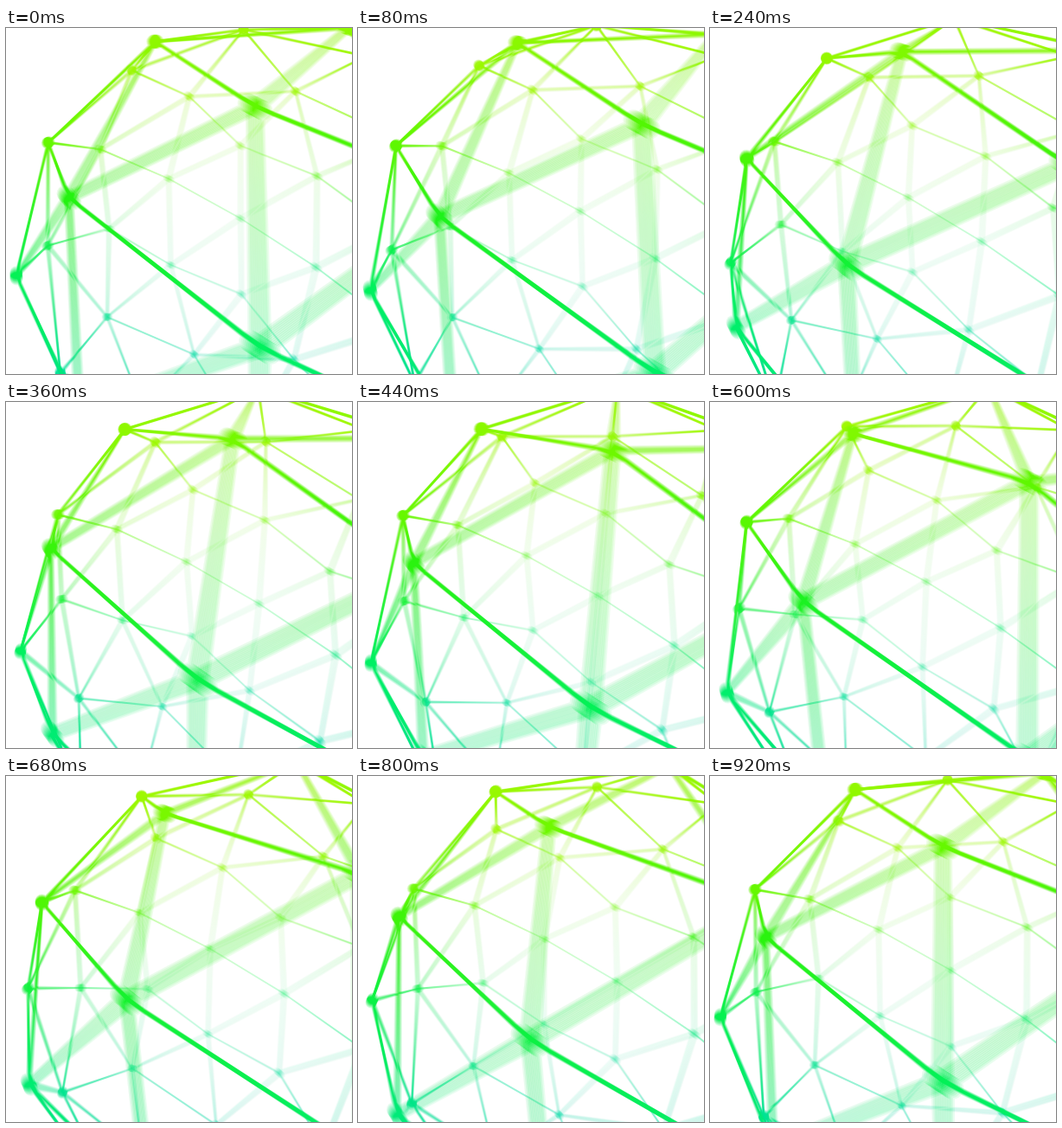
Animation, 400 px wide and 400 px high, one loop 960 ms. Source, as an HTML page with a canvas:

```html
<!DOCTYPE html>
<html>
<head>
<meta charset="utf-8">
<style>
  html, body { margin: 0; width: 100%; height: 100%; overflow: hidden; background: #fff; }
  canvas { display: block; width: 400px; height: 400px; }
</style>
</head>
<body>
<canvas id="stage" width="400" height="400"></canvas>
<script>
const SIZE = 400, STEP_MS = 40, STEPS = 24, TURN = 72, SHUTTER = 12;
const out = document.getElementById('stage').getContext('2d');
const layer = document.createElement('canvas');
layer.width = layer.height = SIZE;
const g = layer.getContext('2d');

// Spin axis and equator basis in view space: x right, y down, z to the viewer
const U = [-.8542, -.4603, .2417], V = [.1345, .249, .9592], N = [.5017, -.8518, .1508];
const DISTANCE = 1.779, SCALE = 242.5, CENTER = [.314, .22];

const rad = deg => deg * Math.PI / 180;
const dist = (a, b) => Math.hypot(a[0] - b[0], a[1] - b[1], a[2] - b[2]);
const mix = (a, b, t) => a + (b - a) * t;

// Icosahedron, each edge split once and pushed out to the sphere
function buildSphere() {
  const corners = [[0, 0, 1], [0, 0, -1]];
  const ring = (start, z) => {
    for (let k = 0; k < 5; k++) {
      const a = rad(start + 72 * k);
      corners.push([Math.cos(a) * 2 / Math.sqrt(5), Math.sin(a) * 2 / Math.sqrt(5), z]);
    }
  };
  ring(54, 1 / Math.sqrt(5));
  ring(18, -1 / Math.sqrt(5));
  const pairs = (points, reach) => points.flatMap((p, i) =>
    points.slice(i + 1).map((q, j) => [i, i + 1 + j]).filter(e => dist(p, points[e[1]]) < reach));
  const middles = pairs(corners, 1.1).map(([i, j]) => {
    const m = corners[i].map((c, k) => c + corners[j][k]);
    const length = Math.hypot(...m);
    return m.map(c => c / length);
  });
  const points = corners.concat(middles);
  return { points, edges: pairs(points, .7) };
}
const sphere = buildSphere();

// Height on the sphere -> red, green, blue
const RAMP = [
  [-.85, 158, 248, 0], [-.45, 100, 248, 0], [-.22, 36, 242, 18],
  [.1, 0, 241, 98], [.55, 0, 226, 152], [1, 0, 215, 175]
];

function color(y, alpha) {
  let i = 1;
  while (i < RAMP.length - 1 && y > RAMP[i][0]) i++;
  const a = RAMP[i - 1], b = RAMP[i];
  const t = Math.min(1, Math.max(0, (y - a[0]) / (b[0] - a[0])));
  const rgb = [1, 2, 3].map(k => Math.round(mix(a[k], b[k], t)));
  return `rgba(${rgb},${alpha})`;
}

function project([px, py, pz], angle) {
  const c = Math.cos(angle), s = Math.sin(angle);
  const a = px * c - py * s, b = px * s + py * c;
  const [x, y, z] = U.map((u, k) => u * a + V[k] * b + N[k] * pz);
  const w = 1 - z / DISTANCE;
  const alpha = Math.min(1, .3 + .7 * Math.pow(Math.max(0, z + 1) / 1.2, 1.3));
  return {
    x: SIZE / 2 + SCALE * (CENTER[0] + x) / w,
    y: SIZE / 2 + SCALE * (CENTER[1] + y) / w,
    z, w, alpha, height: y
  };
}

function drawEdge(p, q) {
  const length = Math.hypot(q.x - p.x, q.y - p.y) || 1;
  const nx = (p.y - q.y) / length, ny = (q.x - p.x) / length;
  const a = 1.25 / p.w, b = 1.25 / q.w;
  const fill = g.createLinearGradient(p.x, p.y, q.x, q.y);
  fill.addColorStop(0, color(p.height, p.alpha ** 1.3));
  fill.addColorStop(1, color(q.height, q.alpha ** 1.3));
  g.fillStyle = fill;
  g.beginPath();
  g.moveTo(p.x + nx * a, p.y + ny * a);
  g.lineTo(q.x + nx * b, q.y + ny * b);
  g.lineTo(q.x - nx * b, q.y - ny * b);
  g.lineTo(p.x - nx * a, p.y - ny * a);
  g.fill();
}

function drawNode(p) {
  g.fillStyle = color(p.height, p.alpha);
  g.beginPath();
  g.arc(p.x, p.y, 5.8 / p.w, 0, 2 * Math.PI);
  g.fill();
}

function drawSphere(degrees) {
  g.fillStyle = '#fff';
  g.fillRect(0, 0, SIZE, SIZE);
  const points = sphere.points.map(p => project(p, rad(degrees)));
  const items = points.map(p => ({ z: p.z, draw: () => drawNode(p) }));
  for (const [i, j] of sphere.edges) {
    const p = points[i], q = points[j];
    items.push({ z: (p.z + q.z) / 2, draw: () => drawEdge(p, q) });
  }
  items.sort((a, b) => a.z - b.z).forEach(item => item.draw());
}

// Motion blur: running average over one step of rotation
function render(step) {
  const perStep = TURN / STEPS;
  for (let i = 0; i < SHUTTER; i++) {
    drawSphere(perStep * (step + (i + .5) / SHUTTER - .5) - .4);
    out.globalAlpha = 1 / (i + 1);
    out.drawImage(layer, 0, 0);
  }
}

let shown = -1;
function tick() {
  const step = Math.floor(performance.now() / STEP_MS) % STEPS;
  if (step !== shown) render(shown = step);
  requestAnimationFrame(tick);
}
tick();
</script>
</body>
</html>
```
